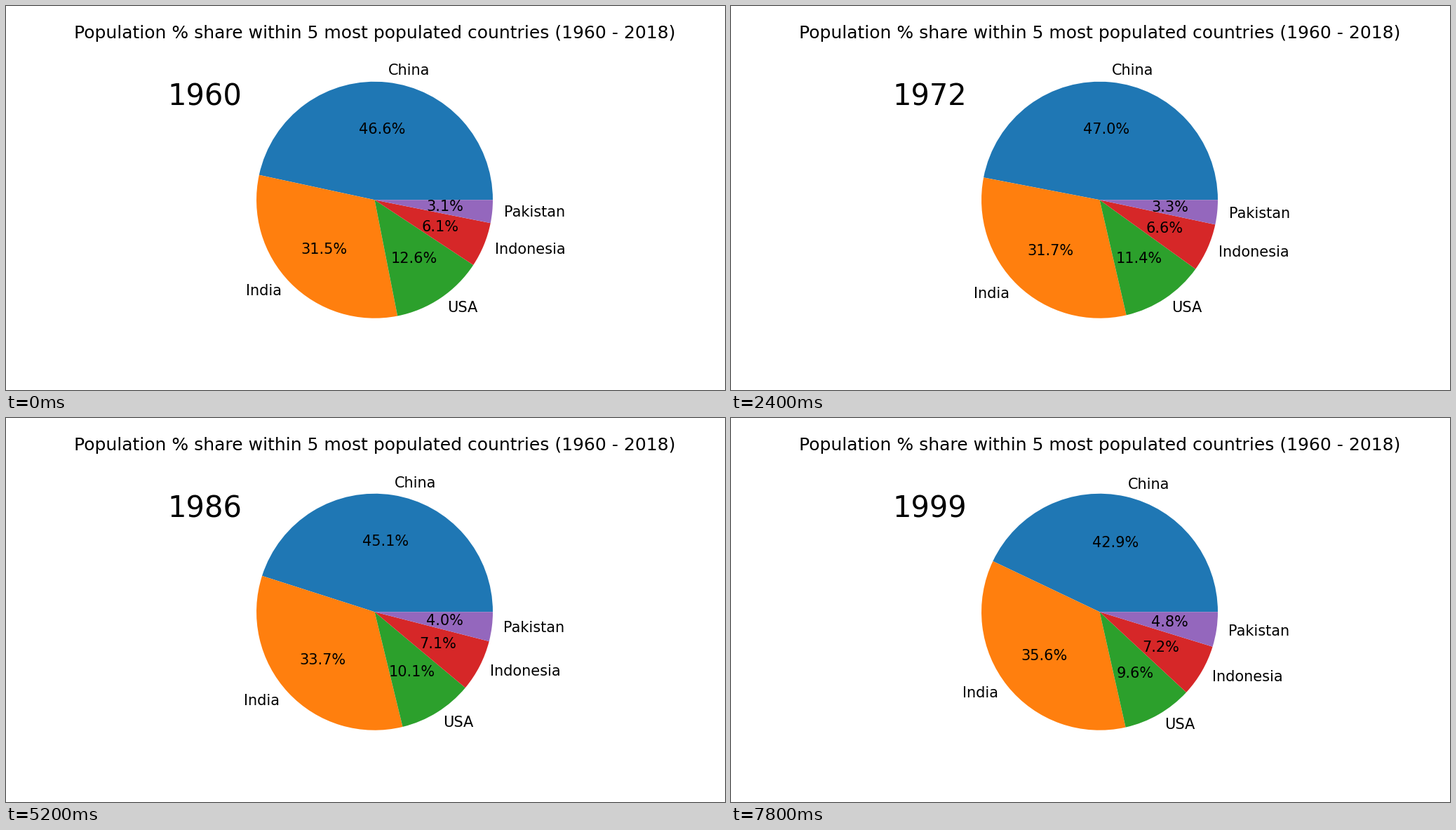
A matplotlib script that plays this animation: 1025x547 px, repeating every 8000 ms.

```python
import matplotlib.pyplot as plt
import numpy as np
from matplotlib.animation import FuncAnimation

W, H = 1025, 547
FIRST, LAST = 1960, 1999
YEARS = np.arange(FIRST, LAST + 1)

# Population in millions at a few key years
KEYS = np.array([1960, 1961, 1964, 1967, 1972, 1975, 1979, 1983, 1990, 1999])
POPULATION = {
    "China": [667.1, 660.3, 698.4, 754.6, 862, 916.4, 969, 1023.3, 1135.2, 1252.7],
    "India": [450.5, 459.6, 488.9, 520.4, 581.1, 623.1, 683, 749.4, 873.3, 1038.1],
    "USA": [180.7, 183.7, 191.9, 198.7, 209.9, 216, 225.1, 233.8, 249.6, 279],
    "Indonesia": [87.8, 90.1, 97.7, 105.9, 121, 130.7, 144, 157.9, 181.4, 208.6],
    "Pakistan": [44.9, 46, 49.5, 53.6, 61.3, 66.8, 75.6, 86.2, 107.7, 138.7],
}
COLORS = ["#1f77b4", "#ff7f0e", "#2ca02c", "#d62728", "#9467bd"]

# Font sizes in pixels (72 dpi makes one point one pixel)
EM = 125 / 6
TITLE_EM = 1.2 * EM
YEAR_EM = 2 * EM


def smooth(values):
    """Cubic Hermite curve through the key years, sampled every year."""
    v = np.array(values)
    slope = np.gradient(v, KEYS, edge_order=2)
    i = np.clip(np.searchsorted(KEYS, YEARS, side="right") - 1, 0, len(KEYS) - 2)
    h = KEYS[i + 1] - KEYS[i]
    s = (YEARS - KEYS[i]) / h
    return ((1 + 2 * s) * (1 - s) ** 2 * v[i]
            + s ** 2 * (3 - 2 * s) * v[i + 1]
            + h * s * (1 - s) ** 2 * slope[i]
            - h * s ** 2 * (1 - s) * slope[i + 1])


curves = [smooth(values) for values in POPULATION.values()]

plt.rcParams["font.family"] = "DejaVu Sans"
fig = plt.figure(figsize=(W / 72, H / 72), dpi=72, facecolor="white")
ax = fig.add_axes([0.1252, 0.11, 0.775, 0.77])


def label(x, y, text, size, **style):
    """Put text at a pixel position, measured from the top left."""
    return fig.text(x / W, 1 - y / H, text, fontsize=size, **style)


label(525.3, 46, "Population % share within 5 most populated countries (1960 - 2018)",
      TITLE_EM, ha="center")
year_text = label(230.4, 142, str(FIRST), YEAR_EM)


def draw(i):
    ax.clear()
    ax.pie([curve[i] for curve in curves], labels=list(POPULATION),
           colors=COLORS, autopct="%1.1f%%", textprops={"fontsize": EM})
    year_text.set_text(str(YEARS[i]))
    return []


anim = FuncAnimation(fig, draw, frames=len(YEARS), interval=200,
                     repeat=True, repeat_delay=0, blit=False)
plt.show()
```
